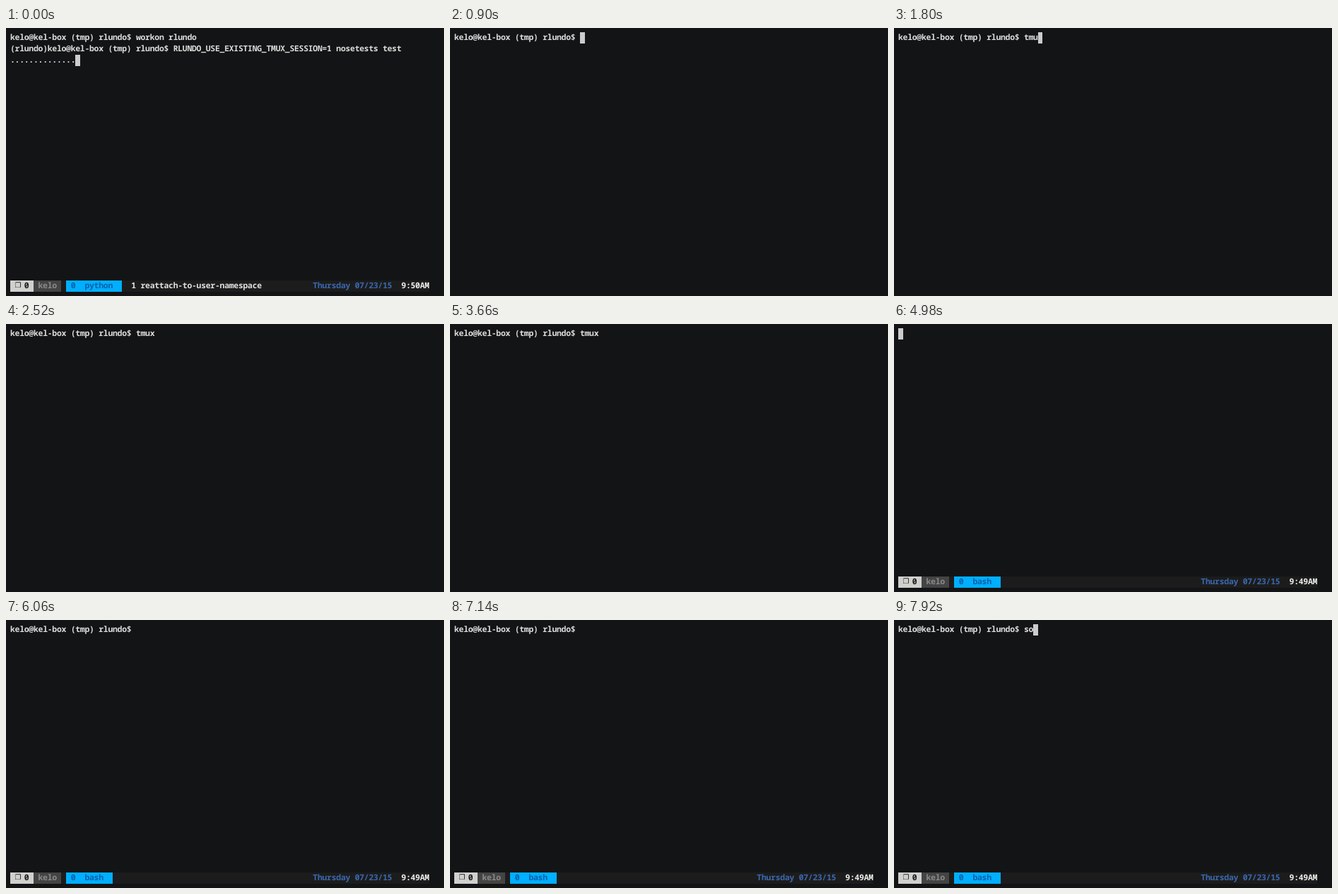
These frames come from a looping animation (620x380 px, 8 s). An HTML page:

```html
<!DOCTYPE html>
<html lang="en">
<head>
<meta charset="utf-8">
<title>Terminal session</title>
<style>
html, body { margin: 0; width: 100%; height: 100%; overflow: hidden; background: #121416; }
#term {
  position: relative; width: 620px; height: 380px; overflow: hidden;
  font: 600 11.5px/16px "Noto Sans Mono", "DejaVu Sans Mono", monospace;
  letter-spacing: -0.31px;
  font-variant-ligatures: none; text-rendering: geometricPrecision;
  color: #dcdcda;
}
#term span { position: absolute; height: 16px; line-height: 15px; white-space: pre; }
#term .icon { font: 400 10px/15px "DejaVu Sans", sans-serif; color: #222; }
</style>
</head>
<body>
<div id="term"></div>
<script>
const LOOP = 8000, COL = 6.59, ROW = 16, PAD = 6, BAR = 22;
const USER = 'kelo';
const PROMPT = USER + '@kel-box (tmp) rlundo$ ';
const HELPER = 'reattach-to-user-namespace';
const term = document.getElementById('term');

function put(col, row, text, color, bg, cls) {
  const s = document.createElement('span');
  s.textContent = text;
  s.style.left = PAD + col * COL + 'px';
  s.style.top = PAD + row * ROW + 'px';
  s.style.width = text.length * COL + 'px';
  if (color) s.style.color = color;
  if (bg) s.style.background = bg;
  if (cls) s.className = cls;
  term.append(s);
  return col + text.length;
}

function statusBar({ user = USER, win, next, clock = '9:49AM' }) {
  put(0, BAR, ' '.repeat(90), '', '#1c1c1c');
  let col = put(0, BAR, '   0 ', '#1a1a1a', '#d0d0ce');
  put(1, BAR, '❐', '', '', 'icon');
  col = put(col, BAR, ` ${user} `, '#8a8a8a', '#444444');
  col = put(col + 1, BAR, ` 0  ${win}  `, '#0660a8', '#00afff');
  if (next) put(col + 2, BAR, '1 ' + next, '#e0e0de');
  put(65, BAR, 'Thursday 07/23/15', '#3a68b0');
  put(84, BAR, clock, '#eeeeec');
}

// lines of text, cursor shown at the end of the last one, status bar
const shell = (typed, cursor, bar) => ({ lines: [PROMPT + typed], cursor, bar });
const bash = { win: 'bash' };
const steps = [
  [0, {
    lines: [
      PROMPT + 'workon rlundo',
      '(rlundo)' + PROMPT + 'RLUNDO_USE_EXISTING_TMUX_SESSION=1 nosetests test',
      '.'.repeat(14)
    ],
    cursor: true,
    bar: { win: 'python', next: HELPER, clock: '9:50AM' }
  }],
  [900, shell('', true)],
  [1380, shell('t', true)],
  [1500, shell('tm', true)],
  [1800, shell('tmu', true)],
  [1920, shell('tmux', true)],
  [2520, shell('tmux', false)],
  [3060, shell('tmux', true)],
  [3660, shell('tmux', false)],
  [4260, shell('tmux', true)],
  [4380, { lines: [''], cursor: true, bar: { user: '', win: HELPER } }],
  [4440, { lines: [''], cursor: true, bar: { win: HELPER } }],
  [4980, { lines: [''], cursor: true, bar: bash }],
  [5520, shell('', true, bash)],
  [6060, shell('', false, bash)],
  [6600, shell('', true, bash)],
  [7140, shell('', false, bash)],
  [7260, shell('s', true, bash)],
  [7380, shell('so', true, bash)],
  [7500, shell('sou', true, bash)],
  [7920, shell('so', true, bash)]
];

function draw({ lines, cursor, bar }) {
  term.replaceChildren();
  lines.forEach((line, row) => put(0, row, line));
  const last = lines.length - 1;
  if (cursor) put(lines[last].length, last, ' ', '', '#cccccc');
  if (bar) statusBar(bar);
}

let shown = null;
const start = performance.now();
function tick() {
  const t = Math.max(0, performance.now() - start) % LOOP;
  const [, state] = steps.findLast(([at]) => at <= t);
  if (state !== shown) draw(shown = state);
  requestAnimationFrame(tick);
}
tick();
</script>
</body>
</html>
```
